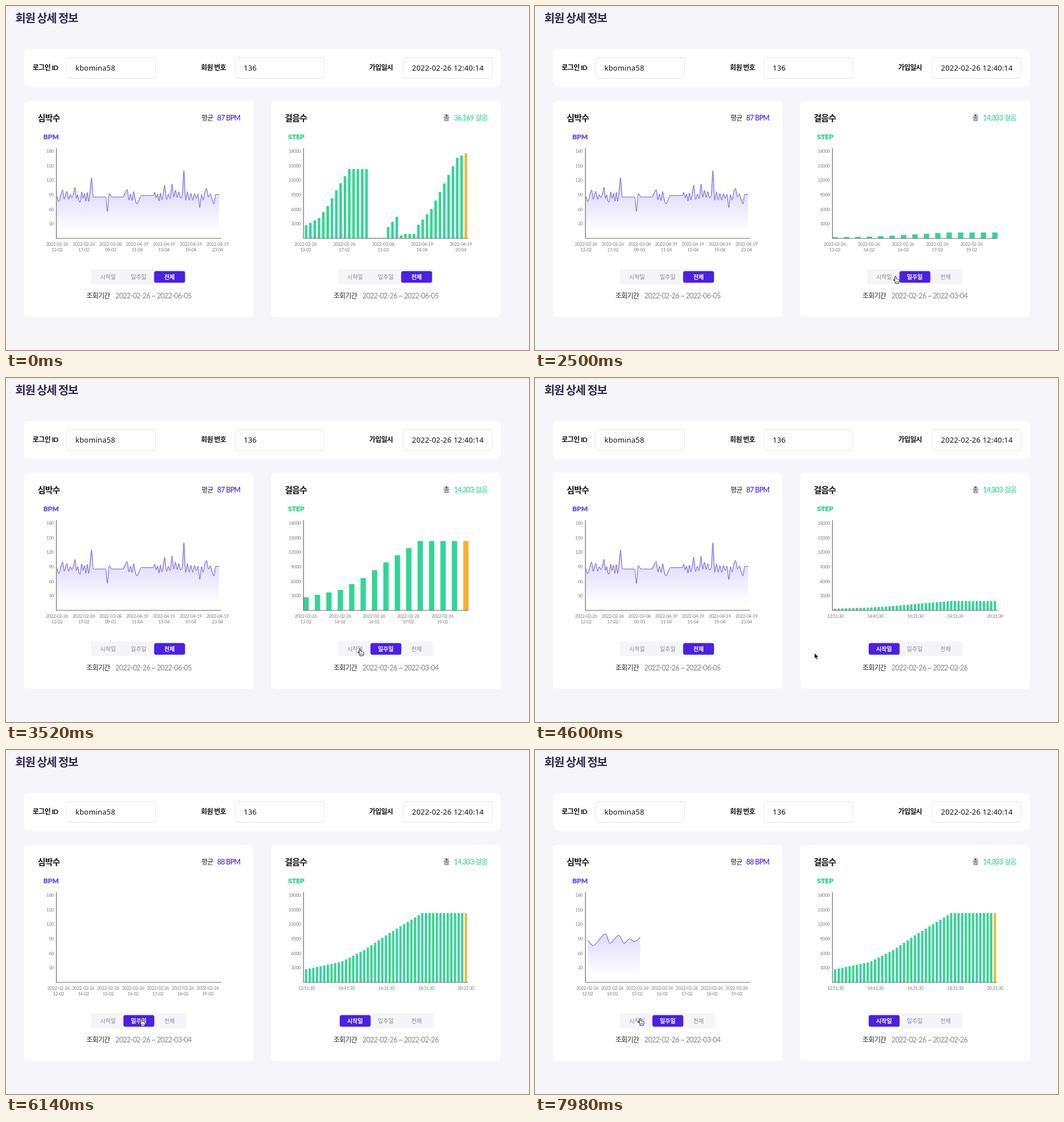
Animation of 923 by 607 pixels, one loop 8000 ms. Source, as an HTML page:

```html
<!DOCTYPE html>
<html lang="ko">
<head>
<meta charset="utf-8">
<title>회원 상세 정보</title>
<style>
html,body{margin:0;width:100%;height:100%;overflow:hidden;background:#f5f5fa}
svg{display:block;width:923px;height:607px}
text{font-family:"Lato","Noto Sans CJK KR",sans-serif}
.b{font-weight:700;fill:#111}
.axis{font-size:8px;letter-spacing:-.4px;fill:#7c7c7c}
.val{font-family:"Noto Sans",sans-serif;font-size:13px;letter-spacing:.2px;fill:#111}
.cap{font-size:12px;letter-spacing:-.7px;fill:#222}
.num{font-size:12.5px;font-weight:500;letter-spacing:-.7px}
.btn{font-size:10.2px;letter-spacing:-.1px;text-anchor:middle}
.date{font-size:12.5px;letter-spacing:-.6px;fill:#85858a}
.unit{font-size:11.8px;font-weight:900;letter-spacing:.15px;stroke-width:.35}
</style>
</head>
<body>
<svg id="stage" viewBox="0 0 923 607" xmlns="http://www.w3.org/2000/svg"></svg>
<script>
const LOOP = 8000;
const PURPLE = '#4a20e6', MINT = '#31d696', GREEN = [49, 214, 150], ORANGE = [249, 177, 51];
// Clicks: weekly steps, daily steps, weekly heart rate
const WEEK = 2080, DAY = 4060, HEART = 6140;
const BASE = 410, PX = 154 / 18000;

const lerp = (a, b, k) => a + (b - a) * k;
const clamp = v => Math.max(0, Math.min(1, v));
const ease = x => .5 - .5 * Math.cos(Math.PI * clamp(x));

// Value of column col at position t, linear between keys
function track(keys, t, col = 1) {
  const i = keys.findIndex(k => k[0] > t);
  if (i < 0) return keys[keys.length - 1][col];
  if (i === 0) return keys[0][col];
  const a = keys[i - 1], b = keys[i];
  return lerp(a[col], b[col], (t - a[0]) / (b[0] - a[0]));
}

// Steps by sample; the week and the day are the first stretch of the same curve
const stepKeys = [[0, 2700], [3, 4200], [5, 6650], [7, 9900], [10, 14303], [14, 14303], [15, 110], [18, 110],
  [19, 2350], [21, 4450], [22, 600], [23, 930], [25, 930], [26, 2800], [29, 6050], [35, 16600], [37, 17550]];
const samples = (n, rate) => Array.from({length: n}, (_, i) => track(stepKeys, i * rate));

function random(seed) {
  return () => (seed = seed * 16807 % 2147483647) / 2147483647;
}

// Heart rate: peaks, flat runs between equal heights, seeded zigzag in other wide gaps
const peaks = [[90, 336], [93, 345], [100, 324.5], [102.5, 341], [107.5, 327], [110.5, 341], [122, 320],
  [131, 346], [151, 303], [154, 337], [176, 337], [179, 363], [182, 331], [187, 337], [206, 337],
  [214, 324], [231, 349], [239, 334.5], [260, 334.5], [280, 316], [293, 314], [311, 334], [314, 290],
  [317, 343], [342, 356], [354, 322], [367, 349], [370, 332.5], [376, 332.5]];

function heartRate() {
  const rnd = random(77), out = [peaks[0]];
  peaks.slice(1).forEach((b, i) => {
    const a = peaks[i], gap = b[0] - a[0];
    if (gap > 8 && a[1] !== b[1]) {
      const n = 2 * Math.max(1, Math.round(gap / 5.6));
      let side = a[1] > 334 ? -1 : 1;
      for (let j = 1; j < n; j++, side = -side) {
        out.push([a[0] + gap * j / n, 335 + side * (2 + 8 * rnd())]);
      }
    }
    out.push(b);
  });
  return out;
}

// Monotone cubic through the points
function curve(p) {
  const s = p.slice(1).map((q, i) => (q[1] - p[i][1]) / (q[0] - p[i][0]));
  const m = p.map((_, i) => {
    const a = s[i - 1] ?? s[i], b = s[i] ?? a;
    return a * b > 0 ? 2 * a * b / (a + b) : 0;
  });
  return p.slice(1).reduce((d, [x, y], i) => {
    const [px, py] = p[i], h = (x - px) / 3;
    return d + `C${px + h} ${py + m[i] * h} ${x - h} ${y - m[i + 1] * h} ${x} ${y}`;
  }, `M${p[0]}`);
}

const text = (x, y, str, cls, extra = '') => `<text x="${x}" y="${y}" class="${cls}" ${extra}>${str}</text>`;
const box = (x, y, w, h, r, fill, extra = '') =>
  `<rect x="${x}" y="${y}" width="${w}" height="${h}" rx="${r}" fill="${fill}" ${extra}/>`;
const mid = 'text-anchor="middle"', end = 'text-anchor="end"';

function field(x, label, value) {
  return text(x, 112.5, label, 'b', 'font-size="12" letter-spacing="-.6"') +
    box(x + 60, 90.5, 157, 37, 5, '#fff', 'stroke="#e5e4ec"') + text(x + 75.5, 113.5, value, 'val');
}

function card(x, title, unit, unitX, color, step) {
  let s = box(x, 167, 405, 382, 7, '#fff') +
    text(x + 24, 203, title, 'b', 'font-size="15" letter-spacing="-.8"') +
    text(unitX, 234.5, unit, 'unit', `fill="${color}" stroke="${color}"`);
  for (let i = 1; i <= 6; i++) s += text(x + 52, 413 - i * 25.67, i * step, 'axis', end);
  return s + box(x + 118, 465, 168.5, 26, 3, '#f5f5f9') + text(x + 110, 516, '조회기간', 'cap');
}

const axes = x => `<path d="M${x} 251V${BASE}H${x + 291}" fill="none" stroke="#666" stroke-width="1.2"/>`;

function xLabels(x0, step, labels) {
  return labels.map((l, i) => l.split(' ').map((line, j) =>
    text(x0 + i * step, 423 + j * 9.5, line, 'axis', mid)).join('')).join('');
}

function buttons(x, active) {
  return ['시작일', '일주일', '전체'].map((name, i) => {
    const on = i === active, left = x + i * 54.2;
    return (on ? box(left, 467.7, 54.5, 20.6, 3.5, PURPLE) : '') +
      text(left + 27, 481.5, name, 'btn', on ? 'fill="#fff" font-weight="700"' : 'fill="#85858f"');
  }).join('');
}

const footer = (x, v) => xLabels(v.lx, v.gap, v.labels) + buttons(x, v.tab) +
  text(x + 40, 516, '2022-02-26 ~ ' + v.to, 'date');

const firstDay = hours => hours.map(h => `2022-02-26 ${h}-02`);
const april = hours => hours.map(h => `2022-04-19 ${h}-04`);

const stepViews = [
  {data: samples(38, 1), w: 4.5, lx: 528.5, gap: 68.5, tab: 2, to: '2022-06-05', total: '36,169', start: -LOOP,
    labels: [...firstDay([13, 17]), '2022-03-08 11-03', ...april([14, 20])]},
  {data: samples(15, 1), w: 9.4, lx: 529, gap: 60.3, tab: 1, to: '2022-03-04', total: '14,303', start: 2285,
    labels: firstDay([13, 14, 16, 17, 19])},
  {data: samples(45, 10 / 32), w: 4, lx: 530.3, gap: 70.4, tab: 0, to: '2022-02-26', total: '14,303', start: 4325,
    labels: [12.85, 14.68, 16.52, 18.52, 20.35].map(h =>
      `${Math.floor(h)}:${Math.round(h % 1 * 60)}:30`)}
];

const beats = heartRate();
const zoomed = beats.filter(p => p[0] < 182).map(([x, y]) => [93 + (x - 90) * 3.14, y]);
const heartViews = [
  {points: beats, lx: 90, gap: 47.2, tab: 2, to: '2022-06-05', avg: 87, start: -LOOP,
    labels: [...firstDay([12, 17]), '2022-03-08 09-03', ...april([11, 15, 19, 23])]},
  {points: zoomed, lx: 92.5, gap: 43.9, tab: 1, to: '2022-03-04', avg: 88, start: 6494,
    labels: firstDay([12, 14, 15, 16, 17, 18, 19])}
];
heartViews.forEach(v => v.line = curve(v.points));

function stepPanel(v, t) {
  const k = ease((t - v.start) / 1150), tint = clamp((k - .2) / .45);
  const last = v.data.length - 1, gap = 282 / last;
  const lastColor = GREEN.map((c, i) => Math.round(lerp(c, ORANGE[i], tint)));
  const bars = v.data.map((val, i) => {
    const h = val * PX * k;
    return box(529.6 + i * gap - v.w / 2, BASE - h, v.w, h, 0, `rgb(${i === last ? lastColor : GREEN})`);
  }).join('');
  return bars + axes(525) + footer(589, v) + text(849.5, 202, v.total + ' 걸음', 'num', `${end} fill="${MINT}"`);
}

function heartPanel(v, t) {
  const k = ease((t - v.start) / 3840), x0 = v.points[0][0];
  return `<clipPath id="reveal"><rect x="${x0}" y="250" width="${(376 - x0) * k}" height="160"/></clipPath>` +
    `<g clip-path="url(#reveal)"><path d="${v.line}V${BASE}H${x0}Z" fill="url(#fade)"/>` +
    `<path d="${v.line}" fill="none" stroke="#7761dc" stroke-width="1.15"/></g>` +
    axes(89) + footer(153, v) + text(413.5, 202, v.avg + ' BPM', 'num', `${end} fill="${PURPLE}"`);
}

// Pointer path: time, x, y
const path = [[440, 655, 578], [1240, 670, 481], [2080, 670, 481], [2500, 637.5, 483], [2820, 626, 483.5],
  [4100, 626, 483.5], [4600, 494, 486], [5200, 264, 478], [5420, 240, 480], [6600, 240, 481], [7980, 187, 479.5]];
const HAND = `<path d="M-2.6 2V-4.6Q-2.6-6-1.4-6T-.2-4.6V-1.4Q1.3-2 1.8-.9 3.3-1.4 3.7-.2 5.5-.5 5.5 1.4V3.2L4 6.6H-1.6Q-2-.2-5 1.2-5.8 0-4.4-.3-3.4-.2-2.6 1"
  fill="#fff" stroke="#222" stroke-linejoin="round"/><path d="M-.1 2.4V4.8M1.6 2.4V4.8M3.2 2.4V4.8" stroke="#333" stroke-width=".7"/>`;
const ARROW = '<path d="M-.5-1V9.6L1.9 7.4 3.7 11.3 5.5 10.4 3.8 6.8H7Z" fill="#111" stroke="#fff" stroke-width=".8"/>';

function pointer(t) {
  if (t < path[0][0]) return '';
  const x = track(path, t), y = track(path, t, 2);
  const overButton = y < 489 && (x < 319 || x > 588);
  return `<g transform="translate(${x} ${y})">${overButton ? HAND : ARROW}</g>`;
}

const stage = document.getElementById('stage');
stage.innerHTML = `<defs><linearGradient id="fade" gradientUnits="userSpaceOnUse" x1="0" y1="290" x2="0" y2="400">
<stop stop-color="#7358e4" stop-opacity=".32"/><stop offset="1" stop-color="#7358e4" stop-opacity="0"/></linearGradient></defs>` +
  box(0, 0, 923, 607, 0, '#f5f5fa') + box(0, 0, 923, 1, 0, '#dedee2') +
  text(16.5, 29, '회원 상세 정보', '', 'font-size="20" font-weight="700" letter-spacing="-1.25" fill="#30264e"') +
  box(32, 76, 841, 66.5, 7, '#fff') +
  field(47, '로그인 ID', 'kbomina58') + field(344, '회원 번호', '136') + field(641, '가입일시', '2022-02-26 12:40:14') +
  card(32, '심박수', 'BPM', 66, '#7259e6', 30) + card(468, '걸음수', 'STEP', 498, MINT, 3000) +
  text(345, 202, '평균', 'cap') + text(772, 202, '총', 'cap') + '<g id="live"></g>';
const live = document.getElementById('live');

function render(t) {
  live.innerHTML = heartPanel(heartViews[t < HEART ? 0 : 1], t) +
    stepPanel(stepViews[t < WEEK ? 0 : t < DAY ? 1 : 2], t) + pointer(t);
}

const begin = performance.now();
function tick(now) {
  render(Math.max(0, now - begin) % LOOP);
  requestAnimationFrame(tick);
}
render(0);
requestAnimationFrame(tick);
</script>
</body>
</html>
```
